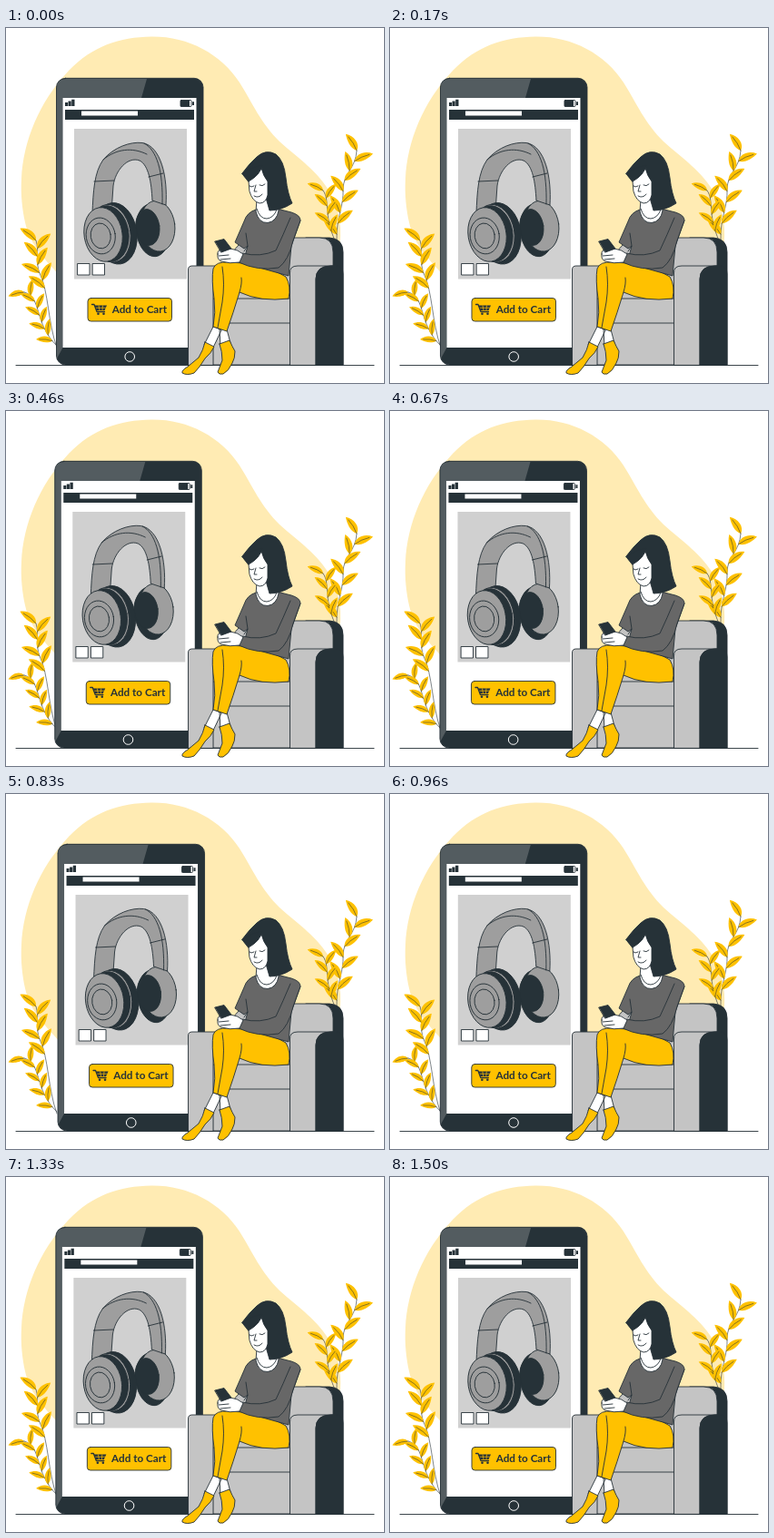
These frames come from a looping animation (416x391 px, 1540 ms). An HTML page:

```html
<!DOCTYPE html>
<html lang="en">
<head>
<meta charset="utf-8">
<title>Add to Cart</title>
<style>
html, body { margin: 0; width: 100%; height: 100%; overflow: hidden; background: #fff; }
svg { display: block; width: 416px; height: 391px; }
.o { stroke: #263238; stroke-width: .9; stroke-linejoin: round; stroke-linecap: round; }
.n { fill: none; }
.dark { fill: #263238; }
.grey { fill: #c4c4c4; }
.mid { fill: #9e9e9e; }
.top { fill: #676767; }
.gold { fill: #ffc100; }
.white { fill: #fff; }
text { font: 700 11.7px Lato, sans-serif; }
</style>
</head>
<body>
<svg viewBox="0 0 416 391">
  <path fill="#ffebb3" d="M17 166C19 125 36 82 69 47C95 20 125 10 160 9.500C200 9 236 28 257 60C272 84 280 104 301 125C322 144 344 158 357 182C367 200 371 222 366 248L340 300H80C59 266 28 249 21 214C18 200 16 184 17 166Z"/>
  <path class="o" d="M11 371.500H405"/>
  <g id="plants" class="n o"></g>

  <g id="phone">
    <rect class="dark o" x="55.500" y="55.300" width="161.500" height="315.700" rx="10"/>
    <path fill="#535c60" d="M155 56L149 77H62.500V352L56 364V66Q56 56 66 56Z"/>
    <path class="white" d="M62.500 77H209.500V352H62.500Z"/>
    <path class="dark" d="M65 82h3v4h-3zM68.500 80.500h3.200V86h-3.200zM72.200 78.800h3.300V86h-3.300zM65 90h142v11H65z"/>
    <path class="white" d="M83 91.500h62v5H83z"/>
    <rect class="white o" x="192" y="79.500" width="12" height="7" rx="1"/>
    <path class="dark" d="M192 79.500h10v7h-10zM205 81.300h2v3.700h-2z"/>
    <path fill="#d0d0d0" d="M75 111h124v165.500H75z"/>

    <g class="o">
      <g transform="rotate(-7 160 220)">
        <ellipse class="dark" cx="161" cy="223" rx="18" ry="29"/>
        <ellipse class="mid" cx="167" cy="219" rx="19" ry="28"/>
        <ellipse class="dark" cx="156" cy="219" rx="13" ry="20"/>
      </g>
      <path class="mid" d="M95 204C96 180 97 159 107 145C119 131 137 125 150 126.500C171 130 178 165 176 195L161 190C160 170 157 151 147 146C134 141 120 157 118 174L116 203Z"/>
      <path class="n" d="M107 145C121 133 139 131 155 139M152 127C166 134 173 158 172 194M97 169L119 168M157 164L173 160"/>
      <g transform="rotate(-9 110 227)">
        <ellipse class="dark" cx="121" cy="228" rx="23" ry="34"/>
        <ellipse class="mid" cx="115" cy="227" rx="22" ry="32"/>
        <ellipse class="dark" cx="113" cy="227" rx="22" ry="31"/>
        <ellipse class="mid" cx="107" cy="227" rx="21" ry="30"/>
        <ellipse class="mid" cx="104" cy="228" rx="16" ry="20"/>
        <ellipse class="mid" cx="104" cy="228" rx="11" ry="14"/>
      </g>
      <path class="white" d="M79 259.500h13V272H79zM95.500 259.500h13V272h-13z"/>
    </g>

    <rect class="gold o" x="90" y="297.500" width="92.500" height="25.500" rx="3.500"/>
    <path class="n o" style="stroke-width:1.300" d="M94.500 304.500H97L100 312.500H108.500"/>
    <path class="dark" d="M97.500 305.500H111L108.500 311H99.700Z"/>
    <path stroke="#ffc100" stroke-width=".7" d="M99 308.200H110M102 305.500L103 311M106.500 305.500L106 311"/>
    <circle class="dark" cx="101.500" cy="314.800" r="1.300"/>
    <circle class="dark" cx="107.500" cy="314.800" r="1.300"/>
    <text class="dark" x="116.700" y="314">Add to Cart</text>
    <circle class="n" cx="136.200" cy="362" r="5.300" stroke="#fff"/>
  </g>

  <g class="o">
    <path class="dark" d="M330 231H356Q371 232 371 247V371H335V262Z"/>
    <path class="grey" d="M245 262Q250 231 280 231H345Q360 231 360 247V263L330 300H245Z"/>
    <path class="grey" d="M228 298H313V371H228Z"/>
    <path class="n" d="M228 325H313"/>
    <path class="grey" d="M200.500 371V266Q200.500 262 205 262H238Q228 263 228 274V371Z"/>
    <path class="grey" d="M312.500 371V270Q312 262 321 262H360Q341 262 341 276V371Z"/>
    <path class="dark" d="M341 371V277Q341 262 357 262H363Q371 262 371 271V371Z"/>
  </g>

  <g class="o">
    <path class="white" d="M228 329L218 349L227 354L237 333ZM235 332L236 350L247 347L243 332Z"/>
    <path class="gold" d="M219 346L229 351Q226 358 219 364Q213 374 207 380Q199 383 194 380Q193 377 200 373L212 363Q217 355 219 346Z"/>
    <path class="gold" d="M235 348L246 344Q249 351 252 356Q252 364 249 369Q245 378 239 381Q234 382 233 379L238 366Q238 356 235 348Z"/>
    <path class="gold" d="M244 258Q284 258 308 274Q314 284 311 298Q280 302 257 291Q250 314 243 334L228 329Q231 313 229 298Q226 277 228 265Q231 257 244 258Z"/>
    <path class="n" d="M238 263Q241 282 238 302L233 330M257 291Q260 281 259 275"/>

    <path class="top" d="M275 200Q265 203 262 213L252 236L262 243L266 240L261 259Q286 266 311 273L314 240L324 212Q324 206 314 203L298 199Z"/>
    <path class="white" d="M276 189L275 202Q278 215 288 214.500Q298 213 300 201L297 182Z"/>
    <path class="n" d="M276 199Q279 210 287 210Q295 209 298 200"/>
    <path class="top" d="M313 209Q305 228 297 245Q280 253 260 248L256 258Q277 268 300 264Q311 256 316 234L324 212"/>
    <path class="n" d="M264 226L266 240L262 246"/>
    <path class="white" d="M233 249Q232 244 239 244L247 243Q255 244 261 249L257 258Q246 260 237 257Q232 255 233 249Z"/>
    <path class="n" d="M234 251L245 250M236 255L247 254"/>
    <path class="dark" d="M230 235L240 232.500L248 243L237 247Z"/>

    <path class="dark" d="M260 160Q268 149 276 142Q286 133 297 139Q306 146 308 165Q310 183 315 193Q303 201 290 201L286 187L268 170Z"/>
    <path class="white" d="M267 164Q276 162 281 154Q283 163 288 169L288 184Q286 193 279 193Q271 191 268 180Z"/>
    <path class="dark" d="M260 160Q271 153 282 151Q280 162 267 169Z"/>
    <path class="n" d="M268 174Q270 176 273 174M279 173Q282 175 285 172M275 173L273 180L276 180M273 185Q278 188 282 183"/>
  </g>
</svg>
<script>
const plants = document.getElementById('plants');
const phone = document.getElementById('phone');

function add(attrs) {
  const path = document.createElementNS('http://www.w3.org/2000/svg', 'path');
  for (const name in attrs) path.setAttribute(name, attrs[name]);
  return plants.appendChild(path);
}

// Leaves alternate left and right from the tip down the stem.
function plant(d, count, gap, size) {
  const stem = add({ d, 'stroke-width': .6 });
  for (let i = 0; i < count; i++) {
    const a = stem.getPointAtLength(i * gap), b = stem.getPointAtLength(i * gap + 8);
    const side = i % 2 ? 1 : -1;
    const angle = Math.atan2(a.y - b.y, a.x - b.x) * 180 / Math.PI + side * 42;
    const transform = `translate(${a.x} ${a.y}) rotate(${angle}) scale(${size} ${size * side})`;
    add({ class: 'gold', stroke: 'none', transform, d: 'M0 0C.2 -.34 .7 -.3 1 0C.7 .12 .3 .22 0 0Z' });
    add({ transform, 'stroke-width': .5 / size, d: 'M0 0Q.4 -.1 .8 -.03' });
  }
}

plant('M33 234C37 246 32 258 37 270C47 290 46 325 56 352', 7, 9, 22);
plant('M20 291C40 296 30 325 56 350', 9, 8, 18);
plant('M386 135C385 155 371 160 371 178C372 196 363 210 364 234', 9, 12, 22);
plant('M349 179C357 190 349 205 362 234', 6, 9, 19);

// Shake peaks at each tenth of the cycle; the second half mirrors the first.
const peaks = [0, -1, 2, -4, 4, -4];
const peak = i => peaks[Math.min(i, 10 - i)];
const loop = 1540, cycle = 1500, step = 1000 / 24, phase = 24, scale = .82;

function shift(ms) {
  const p = ms % cycle / cycle * 10, i = Math.floor(p);
  return scale * (peak(i) + (peak(i + 1) - peak(i)) * (p - i));
}

function draw(now) {
  const tick = Math.floor((now % loop + 4) / step) % 37;
  const x = shift(tick * step + phase) - shift(phase);
  phone.setAttribute('transform', `translate(${x.toFixed(3)} 0)`);
  requestAnimationFrame(() => draw(performance.now()));
}
draw(0);
</script>
</body>
</html>
```
